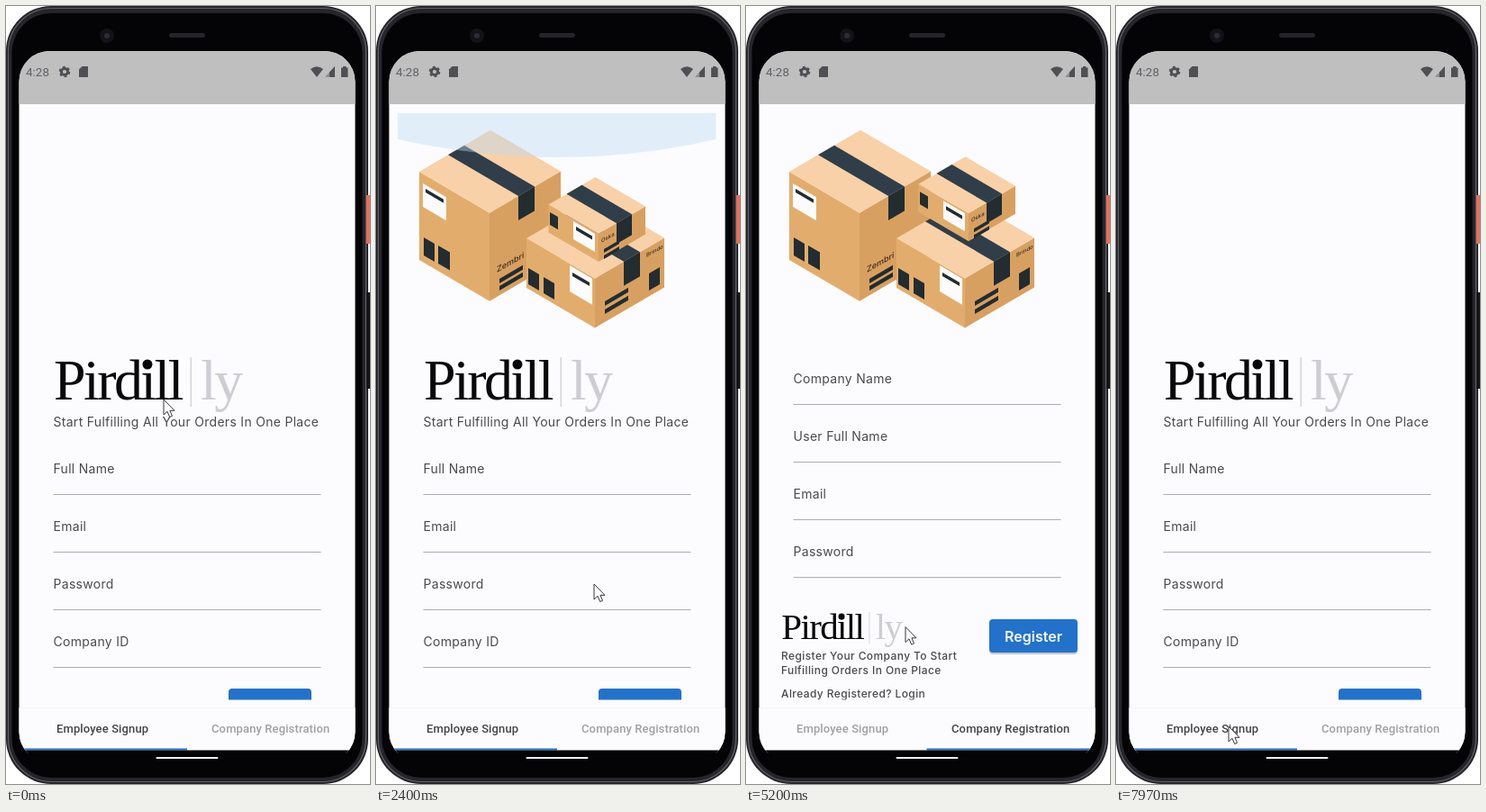
Write an HTML page that moves like this. It is 404 px wide and 864 px high and loops after 8 s.

```html
<!DOCTYPE html>
<html lang="en">
<head>
<meta charset="utf-8">
<title>Order app signup</title>
<style>
  html, body { margin: 0; width: 100%; height: 100%; overflow: hidden; background: #fff; }
  svg { display: block; width: 404px; height: 864px; }
  text { font-family: Inter, sans-serif; fill: #4a4a4e; white-space: pre; }
  .label { font-size: 14px; letter-spacing: .29px; }
  .caption { font-size: 12px; font-weight: 500; letter-spacing: .4px; }
  .tab { font: 500 13px Roboto, sans-serif; letter-spacing: .12px; }
  .clock { font: 13.5px Roboto, sans-serif; fill: #626266; }
  .brand { font: 64px "Liberation Serif", serif; letter-spacing: -2.6px; fill: #08080a; }
  .button { font-size: 16px; font-weight: 600; fill: #fafaff; }
  .print { font-weight: 500; fill: #3a2c1c; }
</style>
</head>
<body>
<svg viewBox="0 0 404 864" id="stage"></svg>
<script>
const SLOPE = 0.585, PAGE = 373, LOOP = 8000;
const DARK = '#222c31', TAPE = '#2f3e48', BLUE = '#2272cc', PAPER = '#fcfcfe', LABEL = '#fbfbfc';

const rect = (x, y, w, h, fill, r = 0, extra = '') =>
  `<rect x="${x}" y="${y}" width="${w}" height="${h}" rx="${r}" fill="${fill}" ${extra}/>`;
const poly = (points, fill) => `<polygon points="${points.join(' ')}" fill="${fill}"/>`;
const text = (x, y, cls, str, extra = '') => `<text x="${x}" y="${y}" class="${cls}" ${extra}>${str}</text>`;

// Parallelogram on an isometric wall: dir 1 faces left, -1 faces right.
const wall = (x, y, w, h, dir, fill) => {
  const d = w * SLOPE * dir;
  return poly([[x, y], [x + w, y + d], [x + w, y + d + h], [x, y + h]], fill);
};
const print = (x, y, size, str) =>
  text(0, 0, 'print', str, `font-size="${size}" transform="matrix(1 -.55 0 1 ${x} ${y})"`);

// (x, y) is the left corner of the lid; a and b are the widths of the two walls.
function carton(x, y, a, b, h, tapeAt, tapeWidth, drop, details) {
  const at = (u, v) => [x + u + v, y + (u - v) * SLOPE];
  const front = at(a, 0), end = tapeAt + tapeWidth, [tx, ty] = at(a, tapeAt);
  return wall(x, y, a, h, 1, '#e2ad6c') + wall(...front, b, h, -1, '#d8a060') +
    poly([at(0, 0), front, at(a, b), at(0, b)], '#f8d1a9') +
    poly([at(0, tapeAt), at(a, tapeAt), at(a, end), at(0, end)], TAPE) +
    wall(tx, ty, tapeWidth, drop, -1, DARK) + details;
}

const cartons = () => {
  const big = carton(48, 184, 78, 79, 98, 32, 18, 27,
    wall(52, 197, 26, 26, 1, LABEL) + wall(55, 203, 20, 4, 1, DARK) +
    wall(53, 257, 12, 20, 1, DARK) + wall(69, 266, 13, 20, 1, DARK) +
    print(134, 296, 9, 'Zembri') +
    wall(137, 303, 26, 5, -1, DARK) + wall(137, 311, 26, 5, -1, DARK));
  const wide = carton(167, 258, 76, 77, 55, 32, 18, 27,
    wall(215, 288, 25, 29, 1, LABEL) + wall(218, 296, 19, 4, 1, DARK) +
    wall(169, 291, 12, 18, 1, DARK) + wall(186, 301, 12, 18, 1, DARK) +
    print(300, 279, 6, 'Brindo') + wall(303, 297, 12, 19, -1, DARK) +
    wall(254, 328, 26, 5, -1, DARK) + wall(254, 337, 26, 5, -1, DARK));
  const small = carton(191.5, 220.5, 55.5, 52, 31, 20, 17, 23,
    wall(219, 239, 24, 20, 1, LABEL) + wall(222, 245, 18, 4, 1, DARK) +
    wall(193, 229, 9, 14, 1, DARK) + print(250, 263, 6, 'Oska') +
    wall(253, 270, 17, 4, -1, DARK) + wall(253, 277, 17, 4, -1, DARK));
  return `<g class="big">${big}</g><g class="wide">${wide}</g><g class="small">${small}</g>`;
};

const brand = transform => `<g transform="${transform}">` +
  text(53, 437, 'brand', 'Pirdill') + '<circle cx="157" cy="398" r="5.5" fill="#08080a"/>' +
  rect(204.5, 390, 1.6, 55, '#d6d6da') + text(216, 437, 'brand', 'ly', 'style="fill:#cdcdd3"') + '</g>';

const fields = (names, y) => names.map((name, i) =>
  text(52.5, y + 5 + i * 64, 'label', name) + rect(52.5, y + 28 + i * 64, 297, 1, '#acacb4')).join('');

const page = (id, body) => `<g id="${id}"><g clip-path="url(#list)">` +
  `<g class="scroll">${cartons()}${body}</g><path class="glow" fill="#b9d9f2"/></g></g>`;

const signup = brand('') +
  text(52.5, 467, 'label', 'Start Fulfilling All Your Orders In One Place') +
  fields(['Full Name', 'Email', 'Password', 'Company ID'], 514) +
  rect(247, 758, 92, 36, BLUE, 4);

const register = fields(['Company Name', 'User Full Name', 'Email', 'Password'], 414) +
  brand('translate(5.4 423) scale(.641)') +
  text(39, 726, 'caption', 'Register Your Company To Start') +
  text(39, 742, 'caption', 'Fulfilling Orders In One Place') +
  text(39, 768, 'caption', 'Already Registered? Login') +
  rect(270, 683, 98, 37, '#c6c6cc', 4) + rect(270, 681, 98, 37, BLUE, 4) +
  text(319, 706, 'button', 'Register', 'text-anchor="middle"');

const statusBar = rect(14, 50, 374, 59, '#bfbfc0') + text(22, 78, 'clock', '4:28') +
  `<g fill="#505054"><circle cx="65" cy="73" r="3.6" fill="none" stroke="#505054" stroke-width="3"/>
   <circle cx="65" cy="73" r="5.3" fill="none" stroke="#505054" stroke-width="2" stroke-dasharray="2.8 2.75"/>
   <path d="M84.5 67H91V79H81V70.5Z"/><path d="M338 70Q345 64.5 352 70L345 79Z"/>
   <path d="M365 67V79H354Z" opacity=".45"/><path d="M365 67V79H359V73.5Z"/>
   <path d="M372 68.5h2v-1.5h3.500v1.500h2V79h-7.500Z"/></g>`;

document.getElementById('stage').innerHTML = `
<defs>
  <clipPath id="screen"><rect x="14.500" y="50" width="373" height="790" rx="34"/></clipPath>
  <clipPath id="list"><rect x="24" y="119" width="353.500" height="651.500"/></clipPath>
</defs>` +
rect(0, 0, 402, 864, '#25252a', 50) +
rect(2.5, 2.5, 397, 859, 'none', 48, 'stroke="#62626a" stroke-width="1.2"') +
rect(6.5, 8, 389, 849, '#040406', 44) +
rect(400, 210, 4, 54, '#e5705a') + rect(400, 318, 4, 107, '#141418') +
'<circle cx="112" cy="33" r="8" fill="#131317"/><circle cx="112" cy="33" r="3" fill="#2d2d36"/>' +
rect(181, 30, 40, 5, '#242429', 2.5) +
`<g clip-path="url(#screen)">${rect(14, 50, 374, 780, PAPER)}` +
page('first', signup) + page('second', register) + statusBar +
rect(14, 779.5, 374, 47.5, PAPER) + rect(14, 779.5, 374, .7, '#f0f0f3') +
rect(201, 780, 187, 46, '#f1f1f3', 0, 'id="rippleRight"') +
rect(14, 780, 187, 46, '#f1f1f3', 0, 'id="rippleLeft"') +
text(56, 807, 'tab', 'Employee Signup', 'id="tabLeft"') +
text(228, 807, 'tab', 'Company Registration', 'id="tabRight"') +
rect(14.5, 824.5, 186.5, 2, BLUE, 0, 'id="marker"') + rect(14, 826.5, 374, 30, '#040406') + '</g>' +
rect(166.5, 834, 69, 2, '#f0f0f4', 1) +
'<path id="cursor" d="M0 0V17L4 13.300L6.700 19.500L9.500 18.300L6.900 12.300H12Z" fill="#fdfdff" stroke="#38383c"/>';

const $ = sel => document.querySelector(sel);
const clamp = v => Math.min(1, Math.max(0, v));
const ramp = (t, from, to) => clamp((t - from) / (to - from));
const smooth = p => p * p * (3 - 2 * p);
const move = (sel, x, y) => $(sel).setAttribute('transform', `translate(${x.toFixed(2)} ${y.toFixed(2)})`);

// Rows are [time, ...values].
function track(rows, t) {
  const i = rows.findIndex(row => row[0] > t);
  if (i < 0) return rows.at(-1).slice(1);
  const a = rows[i - 1], b = rows[i], p = smooth(ramp(t, a[0], b[0]));
  return a.slice(1).map((v, k) => v + (b[k + 1] - v) * p);
}

// cubic-bezier(.25, .1, .25, 1)
function ease(x) {
  const curve = (s, a, b) => 3 * s * (1 - s) ** 2 * a + 3 * s * s * (1 - s) * b + s ** 3;
  let low = 0, high = 1;
  for (let i = 0; i < 20; i++) {
    const mid = (low + high) / 2;
    if (curve(mid, .25, .25) < x) low = mid; else high = mid;
  }
  return curve(low, .1, 1);
}

const pointer = [[0, 175, 437], [1200, 210, 377], [1600, 216, 400], [2400, 242, 642], [2600, 246, 662],
  [3150, 269, 805], [3600, 269, 805], [4500, 200, 679], [5300, 176, 690], [6430, 158, 549],
  [6650, 157, 540], [7450, 125, 800], [8000, 125, 800]];
const topGlow = [[0, 0], [1750, 0], [2350, 1], [2500, 1], [2850, 0]];
const bottomGlow = [[0, 0], [5800, 0], [6350, 1], [6550, 1], [6900, 0]];

// Cartons slide in from the left, then the small one hops once.
function deliver(id, t) {
  const slide = start => -340 * (1 - ramp(t, start, start + 700)) ** 2;
  const hop = 23.5 * Math.sin(Math.PI * ramp(t, 900, 1420));
  move(`#${id} .big`, slide(100), 0);
  move(`#${id} .wide`, slide(58), 0);
  move(`#${id} .small`, slide(58), -hop);
}

function glow(id, edge, dir, side, height, center, power) {
  const path = $(`#${id} .glow`), near = edge + dir * side * power, far = edge + dir * height * power;
  path.setAttribute('d', `M24 ${edge}V${near}Q${center} ${2 * far - near} 377.500 ${near}V${edge}Z`);
  path.setAttribute('opacity', .42 * power);
}

const shade = p => {
  const level = Math.round(160 - 92 * p);
  return `rgb(${level},${level},${level + 4})`;
};

function render(t) {
  const turn = ease(ramp(t, 3250, 3550)) - ease(ramp(t, 7590, 7890));
  move('#first', -PAGE * turn, 0);
  move('#second', PAGE * (1 - turn), 0);
  deliver('first', t < 5000 ? t : t - 7900);
  deliver('second', t - 4000);
  move('#second .scroll', 0, -ramp(t, 5500, 5900));
  glow('first', 119, 1, 29, 49, 205, track(topGlow, t)[0]);
  glow('second', 770.5, -1, 32, 54, 155, track(bottomGlow, t)[0]);

  move('#marker', 186 * turn, 0);
  $('#tabLeft').style.fill = shade(1 - turn);
  $('#tabRight').style.fill = shade(turn);
  $('#rippleRight').setAttribute('opacity', ramp(t, 3150, 3250) * (1 - ramp(t, 3450, 3700)));
  $('#rippleLeft').setAttribute('opacity', ramp(t, 7500, 7590) * (1 - ramp(t, 7720, 7930)));
  move('#cursor', ...track(pointer, t));
}

const begin = performance.now();
function tick() {
  render((performance.now() - begin) % LOOP);
  requestAnimationFrame(tick);
}
render(0);
requestAnimationFrame(tick);
</script>
</body>
</html>
```
